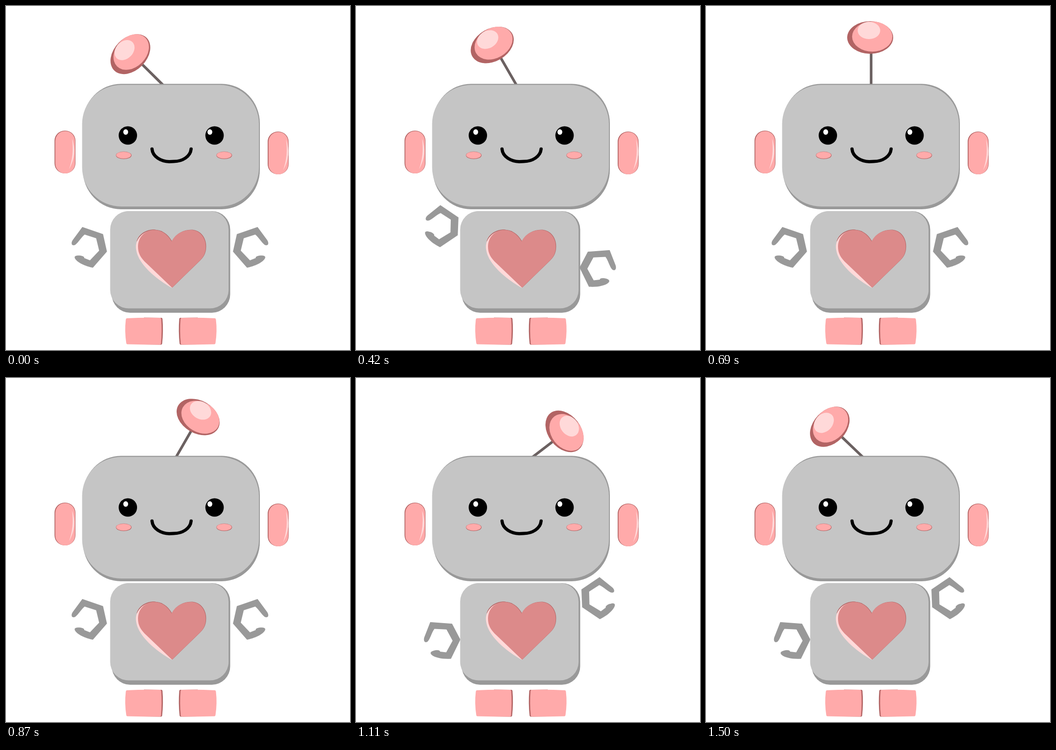
Recreate the animation shown at these times as an HTML page. Size 748 by 748 pixels, loop 1530 ms.

```html
<!DOCTYPE html>
<html lang="en">
<head>
<meta charset="utf-8">
<title>Robot</title>
<style>
  html, body { margin: 0; height: 100%; overflow: hidden; background: #fff; }
  svg { display: block; width: 100%; height: 100%; }
  .dark { fill: #b26464; }
  .pink { fill: #faa; }
  .pale { fill: #ffd9d9; }
  .grey { fill: #c5c5c5; }
  .shade { fill: #999; }
</style>
</head>
<body>
<svg viewBox="0 0 748 748">
  <defs>
    <path id="claw" class="shade" d="M166 480.500L211 496 219.500 534 189 569C173 566 155 558 150 549C147 543 154 542 160 542.500C167 543 171 546 170 548L182.500 553 202.500 532 196 505 171 497C163 503 156 517 149 520C142 522 141 515 145 509Z"/>
    <g id="ear">
      <rect class="dark" x="105.500" y="271" width="45.500" height="93" rx="22"/>
      <rect class="pink" x="107.300" y="272" width="42.700" height="92" rx="21.300"/>
    </g>
    <path id="shine" class="pale" d="M143.500 288Q156 322 137 355Q148.500 324 143.500 288Z"/>
    <g id="foot">
      <path class="dark" d="M300 677.500L338 678Q340 678 340.300 681Q342.500 707 339.500 734Q339 736.500 336 736.500L300 736Z"/>
      <path class="pink" d="M263 679Q300 677 335 678Q337 678 337.500 681Q339.500 707 337 734Q336.500 736.500 334 736.500Q300 736.500 264 735.500Q262 735.500 261.500 733Q257.500 707 260.500 682Q261 679 263 679Z"/>
    </g>
    <circle id="eye" cx="265" cy="281.500" r="20"/>
    <ellipse id="glint" cx="260.300" cy="274" rx="5.300" ry="6" fill="#fff"/>
    <g id="cheek">
      <ellipse class="dark" cx="256" cy="324.700" rx="17" ry="8.100"/>
      <ellipse class="pink" cx="255.800" cy="324.300" rx="16.200" ry="7.400"/>
    </g>
    <path id="heart" d="M360 512C368 496 384 487 402 487C421 487 434.300 503 434.300 523C434.300 541 427 549 415 560L361 612.500 305 559C293 548 287 538 287 523C287 503 302 487 322 487C338 487 351 496 360 512Z"/>
  </defs>

  <g id="antenna">
    <rect x="356.200" y="95" width="5.700" height="83" fill="#6b6161"/>
    <ellipse class="dark" cx="357" cy="68.500" rx="50" ry="35.500"/>
    <ellipse class="pink" cx="361.500" cy="66.500" rx="43.800" ry="32.700"/>
    <ellipse class="pale" cx="354.300" cy="53.300" rx="24.500" ry="18.700"/>
  </g>

  <use id="left" href="#claw"/>
  <g transform="matrix(-1 0 0 1 713 0)"><use id="right" href="#claw"/></g>

  <use href="#ear"/>
  <use href="#shine"/>
  <use href="#ear" x="463.500" y="2"/>
  <use href="#shine" x="465.500" y="2"/>

  <rect class="shade" x="167" y="169.300" width="385" height="272.700" rx="83" ry="86"/>
  <rect class="grey" x="165.500" y="171.500" width="384.500" height="264.500" rx="85"/>
  <use href="#eye"/>
  <use href="#eye" x="188.500"/>
  <use href="#glint"/>
  <use href="#glint" x="183"/>
  <use href="#cheek"/>
  <use href="#cheek" x="218.500"/>
  <path d="M317.500 311C319 328 337 338 355 338.500L365 338C384 338 401 327 402.500 311" fill="none" stroke="#000" stroke-width="7" stroke-linecap="round"/>

  <rect class="shade" x="230" y="446" width="257.500" height="221" rx="40"/>
  <rect class="grey" x="226.500" y="446" width="257.500" height="211.500" rx="40"/>
  <use href="#heart" class="dark" x=".9" y="-.6"/>
  <path class="dark" d="M284 512C288 497 303 486 322 486L340 490Z"/>
  <path class="pale" d="M361 613C340 602 282.500 564 282.500 523C282.500 505 300 487.500 322 487.500L340 540Z"/>
  <use href="#heart" fill="#dc8a8a"/>

  <use href="#foot"/>
  <use href="#foot" transform="matrix(-1 0 0 1 717 0)"/>
</svg>
<script>
  const LOOP = 1530;
  // start time in ms, antenna angle, arm angle
  const poses = [
    [0, -45.4, 0], [420, -30, 15], [690, 0, 0], [870, 30, 0],
    [1110, 52.5, -15], [1290, -7.7, -15], [1500, -46.3, -15]
  ];
  const turn = (id, angle, x, y) =>
    document.getElementById(id).setAttribute('transform', `rotate(${angle} ${x} ${y})`);

  function draw() {
    const t = performance.now() % LOOP;
    const [, antenna, arm] = poses.findLast(([start]) => start <= t);
    turn('antenna', antenna, 357, 190);
    turn('left', arm, 355, 523);
    turn('right', -arm, 355, 523);
    requestAnimationFrame(draw);
  }
  draw();
</script>
</body>
</html>
```
